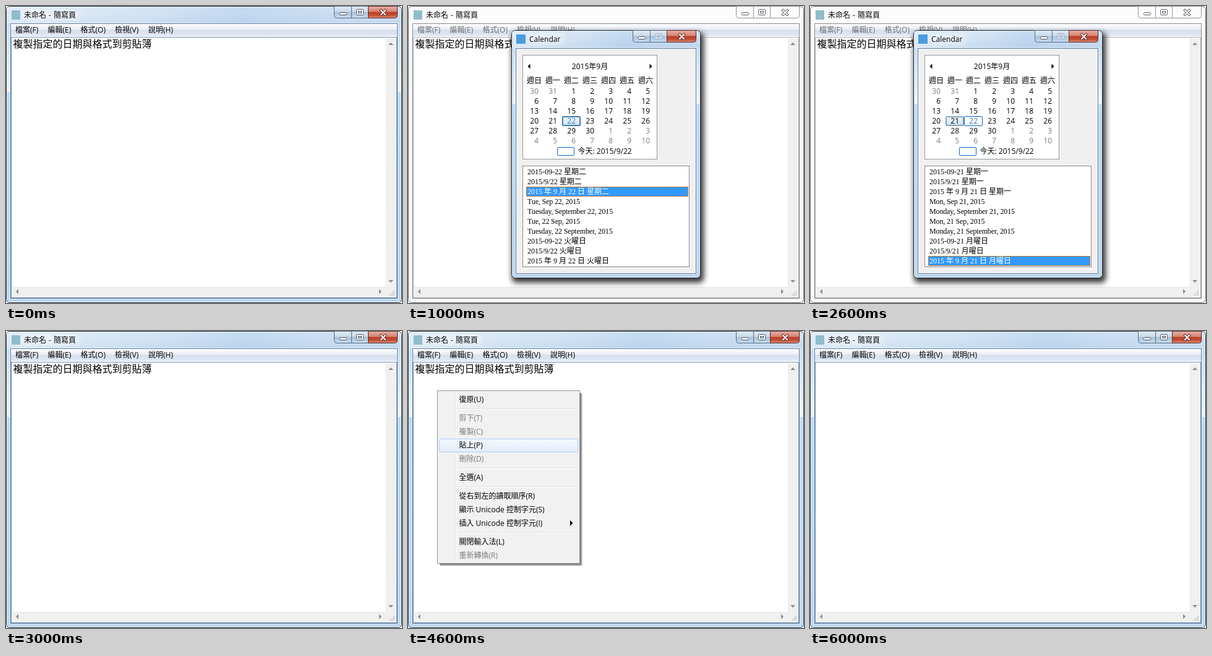
An HTML page for the animation above (7 s loop, 640 by 480 pixels).

```html
<!DOCTYPE html>
<html lang="zh-Hant">
<head>
<meta charset="utf-8">
<title>Date picker demo</title>
<style>
html, body { margin: 0; width: 100%; height: 100%; overflow: hidden; background: #fff; }
svg { display: block; width: 640px; height: 480px; }
text { font: 12px "Open Sans", "Noto Sans CJK TC", "Noto Sans CJK JP", sans-serif; white-space: pre; }
.doc { font: 16px "Liberation Serif", "Noto Sans CJK TC", "Noto Sans CJK JP", serif; word-spacing: 4px; }
.row { font: 12px "Liberation Serif", "Noto Sans CJK TC", "Noto Sans CJK JP", serif; }
.en { letter-spacing: -.14px; }
.title { word-spacing: 1px; }
.end { text-anchor: end; }
.mid { text-anchor: middle; }
</style>
</head>
<body>
<svg viewBox="0 0 640 480" xmlns="http://www.w3.org/2000/svg">
  <defs id="defs"></defs>
  <g id="stage"></g>
</svg>
<script>
const PERIOD = 7000, STEP = 1000;
const GREY = '#7d7d7d', BLUE = '#0066cc';

// ---- drawing helpers ----
const rect = (x, y, w, h, fill, more = '') =>
  `<rect x="${x}" y="${y}" width="${w}" height="${h}" fill="${fill}" ${more}/>`;
// one pixel outline covering the pixels x..x+w-1, y..y+h-1
const box = (x, y, w, h, stroke, fill = 'none', more = '') =>
  rect(x + .5, y + .5, w - 1, h - 1, fill, `stroke="${stroke}" ${more}`);
const path = (d, fill, more = '') => `<path d="${d}" fill="${fill}" ${more}/>`;
const text = (x, y, s, fill = '#000', cls = '') =>
  `<text x="${x}" y="${y}" fill="${fill}" class="${cls}">${s}</text>`;
const gradient = (id, stops, across = false) =>
  `<linearGradient id="${id}" x1="0" y1="0" x2="${across ? 1 : 0}" y2="${across ? 0 : 1}">` +
  stops.map(([at, color, alpha = 1]) =>
    `<stop offset="${at}" stop-color="${color}" stop-opacity="${alpha}"/>`).join('') +
  '</linearGradient>';
// triangle with its tip at x, y pointing along dx, dy
const arrow = (x, y, dx, dy, size, fill) => path(
  `M${x} ${y}L${x - dx * size + dy * size} ${y - dy * size + dx * size}` +
  `L${x - dx * size - dy * size} ${y - dy * size - dx * size}Z`, fill);

document.getElementById('defs').innerHTML =
  gradient('glass', [[0, '#cfe1f4'], [.06, '#bdd5ee'], [.29, '#dcebf9'], [.29, '#b5d8f7'], [1, '#bbd6f0']]) +
  gradient('side', [[0, '#c8def4'], [.25, '#eef6fd'], [.25, '#b9dbf9'], [1, '#bcd8f2']]) +
  gradient('shine', [[0, '#fff', .45], [.35, '#fff', .2], [.6, '#a8c8e8', .2], [1, '#fff', .1]], true) +
  gradient('button', [[0, '#e2ecf6'], [.46, '#c9d9e9'], [.5, '#a9c0d7'], [1, '#c6dcf0']]) +
  gradient('close', [[0, '#e7b3a7'], [.46, '#d4816f'], [.5, '#b93a22'], [.8, '#c5553c'], [1, '#df9a80']]) +
  gradient('menubar', [[0, '#fdfdfe'], [.45, '#e9edf6'], [.5, '#d7dfee'], [.9, '#dfe6f3'], [1, '#eef1f8']]) +
  gradient('hot', [[0, '#f3f7fc'], [1, '#e3eefb']]) +
  gradient('day', [[0, '#eef6fd'], [1, '#cfe5f8']]) +
  '<filter id="blur" x="-20%" y="-20%" width="140%" height="140%"><feGaussianBlur stdDeviation="5"/></filter>';

// ---- window frame ----
function captionButtons(right, top, active, canMax) {
  const x = right - 110;
  const edge = active ? '#566b82' : '#8f959c';
  const ink = active ? '#4a5766' : '#5b6068';
  const face = active ? 'url(#button)' : '#fdfdfe';
  const y = top + .5, base = top + 19.5;
  const cross = `M${x + 76} ${top + 7}l7 7m0 -7l-7 7`;
  const maxInk = canMax ? ink : '#9db0c3';
  return path(`M${x + .5} ${y}H${x + 28.5}V${base}H${x + 4.5}q-4 0-4-4Z`, face, `stroke="${edge}"`) +
    path(`M${x + 28.5} ${y}H${x + 55.5}V${base}H${x + 28.5}Z`, face, `stroke="${edge}"`) +
    path(`M${x + 55.5} ${y}H${x + 102.5}V${base - 4}q0 4-4 4H${x + 55.5}Z`,
      active ? 'url(#close)' : face, `stroke="${active ? '#5a2a2a' : edge}"`) +
    box(x + 9, top + 10, 12, 5, ink, '#fff', 'rx="1"') +
    box(x + 36, top + 5, 12, 10, maxInk, canMax ? '#fff' : '#d5e1ed', 'rx="1"') +
    box(x + 39, top + 8, 6, 4, maxInk, face) +
    path(cross, 'none', `stroke="${active ? '#6b3030' : ink}" stroke-width="4" stroke-linecap="square"`) +
    path(cross, 'none', 'stroke="#fff" stroke-width="2" stroke-linecap="square"');
}

function frame(x, y, w, h, active, bar, canMax = true) {
  const inner = h - bar - 7;
  let s = box(x, y, w, h, active ? '#20282f' : '#5c6166', active ? 'url(#glass)' : '#fcfcfd', 'rx="6"');
  if (active) {
    s += rect(x + 1, y + 2, w - 2, bar - 1, 'url(#shine)') +
      rect(x + 1, y + bar, 7, inner, 'url(#side)') +
      rect(x + w - 8, y + bar, 7, inner, 'url(#side)');
  }
  return s + box(x + 1, y + 1, w - 2, h - 2, active ? '#e6f5ff' : '#fff', 'none', 'rx="5" opacity=".85"') +
    captionButtons(x + w, y, active, canMax);
}

const glow = (x, y, w) => rect(x, y, w, 15, '#fff', 'rx="6" opacity=".5" filter="url(#blur)"');

// ---- text editor ----
const MENUS = [[15, '檔案(F)'], [67.5, '編輯(E)'], [120.5, '格式(O)'], [176, '檢視(V)'], [230, '說明(H)']];
const HEADING = '複製指定的日期與格式到剪貼簿';

function editor(active, lines) {
  let s = frame(0, 0, 640, 480, active, 28);
  if (active) s += glow(26, 7, 92);
  s += rect(9, 7, 14, 15, '#8fbccb') + text(29, 19, '未命名 - 隨寫頁', '#000', 'title') +
    box(6, 27, 628, 447, '#fff', 'none', 'opacity=".55"') +
    box(7, 28, 626, 445, active ? '#5d7c9b' : '#85898e', '#fff') +
    rect(8, 29, 624, 20, 'url(#menubar)') +
    MENUS.map(([x, label]) => text(x, 43, label, active ? '#000' : '#6d6d6d')).join('') +
    box(8, 50, 624, 422, active ? '#6d93b8' : '#abadb3', '#fff') +
    rect(614, 52, 17, 402, '#f0f0f0') + rect(614, 52, 1, 402, '#e6e6e6') +
    rect(10, 454, 621, 17, '#f0f0f0') + rect(10, 454, 604, 1, '#e6e6e6') +
    arrow(622, 59, 0, -1, 4, '#8a8a8a') + arrow(622, 447, 0, 1, 4, '#8a8a8a') +
    arrow(16, 461.5, -1, 0, 4, '#8a8a8a') + arrow(607, 461.5, 1, 0, 4, '#8a8a8a');
  for (let i = 0; i < 3; i++)
    for (let j = 2 - i; j < 3; j++) s += rect(620 + j * 3, 460 + i * 3, 2, 2, '#c3c3c3');
  lines.forEach((line, i) => { s += text(11.5, 67 + i * 16, line, '#000', 'doc'); });
  return s;
}

// ---- calendar dialog ----
function formats(day) {
  const i = (day + 1) % 7;   // 20 September 2015 is a Sunday
  const zh = '星期' + '日一二三四五六'[i], ja = '日月火水木金土'[i] + '曜日';
  const en = ['Sunday', 'Monday', 'Tuesday', 'Wednesday', 'Thursday', 'Friday', 'Saturday'][i];
  const local = name => [`2015-09-${day} ${name}`, `2015/9/${day} ${name}`, `2015 年 9 月 ${day} 日 ${name}`];
  const short = en.slice(0, 3);
  return [...local(zh), `${short}, Sep ${day}, 2015`, `${en}, September ${day}, 2015`,
    `${short}, ${day} Sep, 2015`, `${en}, ${day} September, 2015`, ...local(ja)];
}

function month(day) {
  const today = 22, left = d => 189 + (d + 1) % 7 * 30;
  let s = box(185, 79, 218, 169, '#92969c', '#fff') +
    arrow(193.5, 97.5, -1, 0, 4, '#000') + arrow(394.5, 97.5, 1, 0, 4, '#000') +
    text(294, 102, '2015年9月', '#000', 'mid');
  for (let i = 0; i < 7; i++) s += text(204 + i * 30, 125, '週' + '日一二三四五六'[i], '#000', 'mid');
  s += rect(190, 129, 208, 1, '#f2f2f2');
  if (day !== today) s += box(left(day), 178, 30, 16, '#86b6dd', 'url(#day)', 'rx="2"');
  s += box(left(today), 178, 30, 16, BLUE, day === today ? 'url(#day)' : '#fff', 'rx="1"') +
    box(left(day) + 1, 179, 28, 14, '#333', 'none', 'stroke-dasharray="1 1"');
  for (let i = 0; i < 42; i++) {
    const d = i - 1;
    const n = d < 1 ? d + 31 : d > 30 ? d - 30 : d;
    const color = d < 1 || d > 30 ? GREY : d === today ? '#3b80bd' : '#000';
    s += text(211 + i % 7 * 30, 142 + Math.floor(i / 7) * 16, n, color, 'end');
  }
  return s + box(241, 228, 28, 14, BLUE, '#fff', 'rx="1"') + text(274.5, 239, '今天: 2015/9/22');
}

function dialog(day, pick) {
  let s = rect(168, 43, 310, 404, '#000', 'rx="7" opacity=".8" filter="url(#blur)"') +
    frame(167, 39, 306, 401, true, 29, false) +
    glow(194, 46, 58) +
    rect(175, 46, 15, 15, '#4a9ce0') + text(196, 58, 'Calendar') +
    box(173, 67, 294, 367, '#fff', 'none', 'opacity=".55"') +
    box(174, 68, 292, 365, '#5d7c9b', '#f0f0f0') +
    month(day) + box(185, 258, 270, 164, '#828790', '#fff');
  formats(day).forEach((line, i) => {
    const y = 260 + i * 16, on = i === pick;
    if (on) s += box(191, y, 262, 16, '#bd7a34', '#3399ff');
    s += text(193, y + 12, line, on ? '#fff' : '#000', i > 2 && i < 7 ? 'row en' : 'row');
  });
  return s;
}

// ---- context menu ----
const ITEMS = ['復原(U)', '-', '!剪下(T)', '!複製(C)', '貼上(P)', '!刪除(D)', '-', '全選(A)', '-',
  '從右到左的讀取順序(R)', '顯示 Unicode 控制字元(S)', '插入 Unicode 控制字元(I)', '-',
  '關閉輸入法(L)', '!重新轉換(R)'];

function contextMenu() {
  let s = '';
  for (let i = 0; i < 4; i++) s += rect(51, 100, 231 - i, 280 - i, '#000', 'rx="2" opacity=".17"');
  s += box(47, 96, 231, 280, '#979797', '#f1f1f1') +
    rect(76, 99, 1, 274, '#e2e3e3') + rect(77, 99, 1, 274, '#fff');
  let y = 99;
  for (const item of ITEMS) {
    if (item === '-') {
      s += rect(77, y + 4, 198, 1, '#e0e0e0') + rect(77, y + 5, 198, 1, '#fff');
      y += 8;
      continue;
    }
    const off = item[0] === '!';
    if (item.startsWith('貼上')) s += box(50, y + 1, 225, 22, '#aecff7', 'url(#hot)', 'rx="2"');
    if (item.startsWith('插入')) s += arrow(266.5, y + 11.5, 1, 0, 4.5, '#000');
    s += text(82.5, y + 15.5, off ? item.slice(1) : item, off ? GREY : '#000');
    y += 22;
  }
  return s;
}

// ---- timeline ----
const blank = editor(true, [HEADING]);
const behind = editor(false, [HEADING]);
const scenes = [
  blank,
  behind + dialog(22, 2),
  behind + dialog(21, 9),
  blank,
  blank + contextMenu(),
  editor(true, [HEADING, '', formats(21)[9]]),
  editor(true, [])
];

const stage = document.getElementById('stage');
let shown = -1;
function render(ms) {
  const i = Math.floor(ms % PERIOD / STEP);
  if (i !== shown) stage.innerHTML = scenes[shown = i];
}
function tick() {
  render(performance.now());
  requestAnimationFrame(tick);
}
tick();
</script>
</body>
</html>
```
